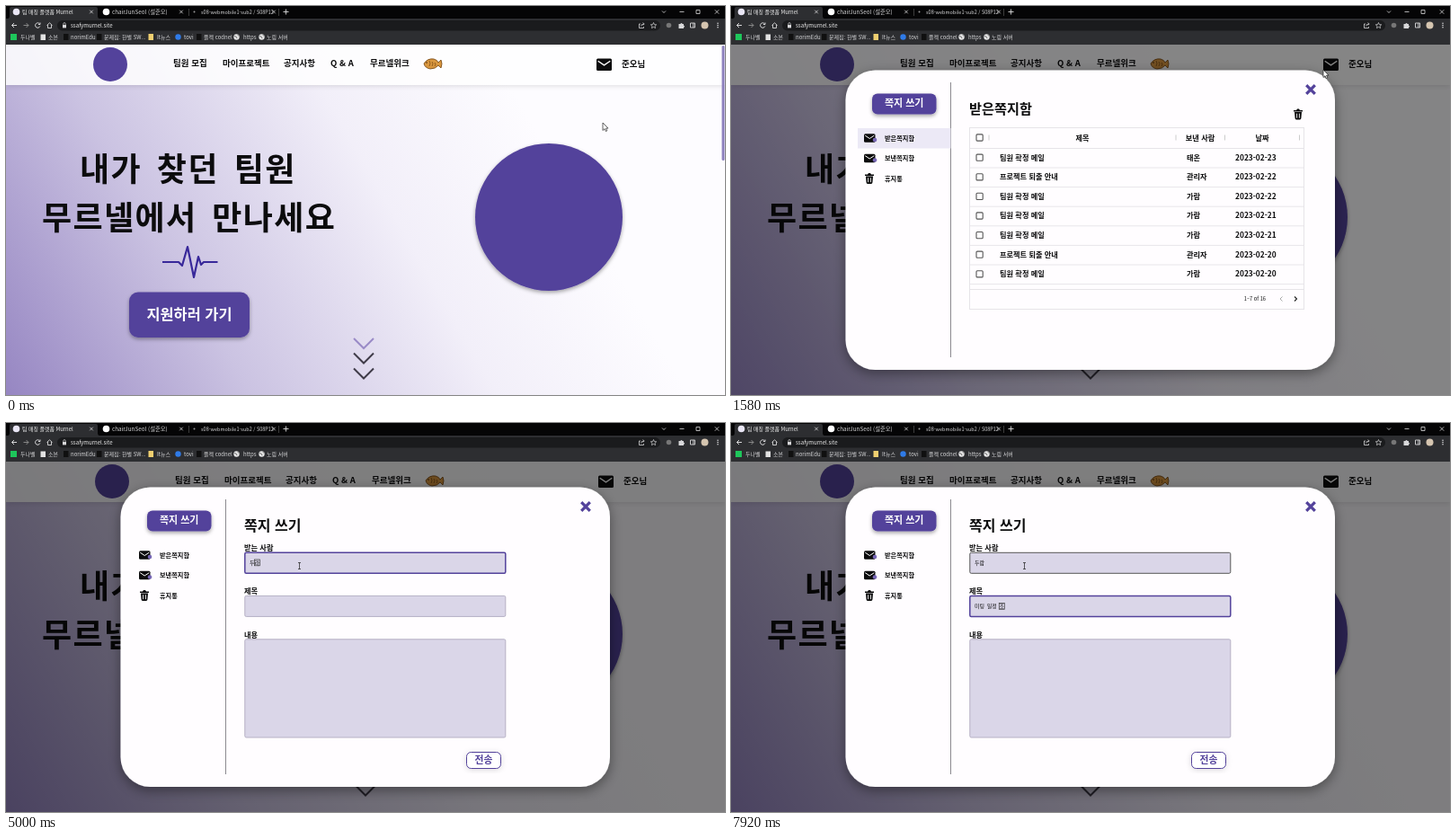
An HTML page for the animation above (8000 ms loop, 800 px wide and 433 px high).

```html
<!DOCTYPE html>
<html lang="ko">
<head>
<meta charset="utf-8">
<title>팀 매칭 플랫폼</title>
<style>
  html, body { margin: 0; width: 100%; height: 100%; overflow: hidden; background: #fff; }
  svg { display: block; width: 100vw; height: 100vh; }
  text { font-family: "Noto Sans CJK KR", "Noto Sans CJK", "Noto Sans", sans-serif; white-space: pre; }
</style>
</head>
<body>
<svg id="stage" viewBox="0 0 800 433" xmlns="http://www.w3.org/2000/svg"></svg>
<script>
const PURPLE = '#53429b';
const INK = '#0c0c0d';
const LIGHT = '#d8d8da';

// Markup helpers
const text = (x, y, s, size, fill = INK, weight = 900, extra = '') =>
  `<text x="${x}" y="${y}" font-size="${size}" fill="${fill}" font-weight="${weight}" ${extra}>${s}</text>`;
const middle = 'text-anchor="middle"';
const rect = (x, y, w, h, fill, extra = '') =>
  `<rect x="${x}" y="${y}" width="${w}" height="${h}" fill="${fill}" ${extra}/>`;
const circle = (x, y, r, fill, extra = '') =>
  `<circle cx="${x}" cy="${y}" r="${r}" fill="${fill}" ${extra}/>`;
const line = (d, stroke, width = 1, extra = '') =>
  `<path d="${d}" fill="none" stroke="${stroke}" stroke-width="${width}" ${extra}/>`;
const shape = (d, fill, extra = '') => `<path d="${d}" fill="${fill}" ${extra}/>`;
const group = (id, body) => `<g id="${id}">${body}</g>`;
const cross = (x, y, r, stroke, width) =>
  line(`M${x - r} ${y - r}l${2 * r} ${2 * r}m0 ${-2 * r}l${-2 * r} ${2 * r}`, stroke, width);

const envelope = (x, y, w, h) =>
  rect(x, y, w, h, INK, 'rx="1.5"') +
  line(`M${x + w * .1} ${y + h * .2}L${x + w / 2} ${y + h * .55}L${x + w * .9} ${y + h * .2}`, '#fff', w * .08);
const trash = (x, y) =>
  shape(`M${x - 5} ${y - 4.5}h3l1 -1.5h2l1 1.5h3v1.5h-10z`, INK) +
  shape(`M${x - 4} ${y - 2.4}h8l-.6 7q-.1 1.4 -1.4 1.4h-4q-1.3 0 -1.4 -1.4z`, INK) +
  line(`M${x - 1.4} ${y - .8}v5m2.8 0v-5`, '#fff', .9);
const globe = (x, y) => circle(x, y, 3.2, '#e6e6e6') +
  line(`M${x - 2.4} ${y - 1}l2 .6l1 2m.4 -4l1.6 1.2`, '#555', .8);
const checkbox = (y) => rect(273, y - 3.6, 7.2, 7.2, 'none', 'rx="1" stroke="#555" stroke-width="1.1"');

function browserBar() {
  const tabClose = [95, 195, 298].map(x => cross(x, 6.5, 1.8, LIGHT, .8)).join('');
  const marks = [
    [16, '두나벨'], [47, '소븐'], [72, 'norimEdu'], [109, '문제집: 한벌 SW...'], [168, 'It뉴스'],
    [198, 'tovi'], [220, '플젝 codnel'], [264, 'https'], [290, '노림 서버']
  ].map(([x, s]) => text(x, 36.8, s, 6, LIGHT, 400)).join('');
  return rect(0, 0, 800, 43, '#2d2e31') + rect(0, 0, 800, 14, '#050506') +
    shape('M2 14Q4 14 4 11V3Q4 1 6 1H100Q102 1 102 3V11Q102 14 104 14z', '#2d2e31') +
    circle(11.5, 6.5, 3.8, '#e9e6f5') + text(18, 9, '팀 매칭 플랫폼 Murnel', 5.9, '#eee', 400) +
    circle(111.5, 6.5, 3.8, '#fff') + text(118, 9, 'chairJunSeol (설준오)', 6.3, LIGHT, 400) +
    circle(209.5, 6.5, 1, '#999') + text(217, 9, 's08-webmobile1-sub2 / S08P12', 5.5, LIGHT, 400) +
    tabClose + line('M203.5 3v8M303.5 3v8', '#555', .7) + line('M308.5 6.5h6m-3 -3v6', LIGHT, .9) +
    line('M730 5.5l2 2l2 -2M749.5 6.5h5M768 4.5h4v4h-4z', LIGHT, .8) + cross(791, 6.5, 2.2, LIGHT, .8) +
    line('M12 21.5H6.5m2.5 -2.5l-2.5 2.5l2.5 2.5', LIGHT) +
    line('M19.5 21.5h5.5m-2.5 -2.5l2.5 2.5l-2.5 2.5', '#888') +
    line('M37.5 20a2.7 2.7 0 1 0 .3 2.5M38 18.5v2h-2', LIGHT) +
    line('M45.5 21.5l3 -2.7l3 2.7M46.5 21v3.5h4V21', LIGHT, .9) +
    rect(57, 16, 671, 11.5, '#1a1b1d', 'rx="5.7"') +
    rect(63, 21, 4, 3.4, LIGHT) + line('M63.8 21v-1.2a1.2 1.2 0 0 1 2.4 0v1.2', LIGHT, .7) +
    text(72, 24, 'ssafymurnel.site', 6.1, '#eee', 400) +
    line('M706 20h-1.5v4.5h5V23M706.5 22.5q0 -2.5 3.5 -2.5m-1.3 -1.5l1.5 1.5l-1.5 1.5', LIGHT, .8) +
    line('M720.5 18.5l.9 2.1l2.3 .2l-1.7 1.5l.5 2.3l-2 -1.2l-2 1.2l.5 -2.3l-1.7 -1.5l2.3 -.2z', LIGHT, .7) +
    circle(737.5, 21.5, 2.8, '#777') +
    shape('M748.5 20h2a1 1 0 0 1 2 0h1.5v1.7a1 1 0 0 1 0 2v1.3h-5.5z', LIGHT) +
    line('M761.5 19h5v5h-5zM764.8 19v5', LIGHT, .9) +
    circle(777.5, 21.5, 4, '#d5c5b0') + [-2.3, 0, 2.3].map(d => circle(792, 21.5 + d, .8, LIGHT)).join('') +
    rect(5, 31, 7, 7, '#1ec65b') + rect(38.5, 31.5, 5.5, 6.5, '#e2e2e2') +
    [64, 101, 212].map(x => rect(x, 31, 5.5, 7, '#101010')).join('') +
    rect(158.5, 31, 5.5, 7, '#f0cf70') + circle(191.5, 34.5, 3.2, '#2f7be8') +
    globe(256.5, 34.5) + globe(284.5, 34.5) + marks;
}

function page() {
  const nav = [[186, '팀원 모집'], [241, '마이프로젝트'], [309, '공지사항'], [361, 'Q &amp; A'], [405, '무르넬위크']]
    .map(([x, s]) => text(x, 67.3, s, 9.5)).join('');
  const fish = shape('M465 64q4 -6 11 -5q4 1 5 4l3 -3q2 4 0 9l-3 -3q-3 4 -9 4q-6 -1 -7 -6z', '#d9973f', 'stroke="#70420f" stroke-width=".8"') +
    line('M471 61q2 3 0 6m3 -5q2 2 0 5m3 -4q2 2 0 4', '#70420f', .7) + circle(468, 63, .8, '#40240a');
  const chevrons = [['#9a8bc7', 370], ['#3f3b48', 386.5], ['#3f3b48', 403.5]]
    .map(([c, y]) => line(`M387 ${y}l11 11l11 -11`, c, 2)).join('');
  const hero = (x, y, s) => text(x, y, s, 36, INK, 700, 'letter-spacing="1.35" word-spacing="5.5"');
  return rect(0, 42, 800, 391, 'url(#sky)') +
    hero(82, 195, '내가 찾던 팀원') + hero(40, 249, '무르넬에서 만나세요') +
    line('M174 285H192L196 289L202 268L209 302L214 279L217 288L220 285H235.5', '#38289a', 2.2, 'stroke-linejoin="round"') +
    rect(137, 318.5, 134, 50.5, PURPLE, 'rx="10" filter="url(#soft)"') +
    text(204, 348.5, '지원하러 가기', 16.4, '#fff', 700, middle) +
    circle(604, 235, 82, PURPLE, 'filter="url(#soft)"') +
    group('chevrons', chevrons) +
    rect(0, 42, 800, 46, '#fff', 'opacity=".86" filter="url(#faint)"') +
    group('header', circle(116, 65, 19, PURPLE) + nav + fish + envelope(657, 58.5, 17, 13.5) + text(685, 68.3, '준오님', 9.5)) +
    rect(796.5, 44, 3, 128, '#8d80bd', 'rx="1.5" id="scrollbar"') +
    rect(0, 42, 800, 391, '#000', 'id="shade" opacity="0"');
}

function inbox() {
  const confirm = '팀원 확정 메일', leave = '프로젝트 퇴출 안내';
  const mails = [
    [confirm, '태온', 23], [leave, '관리자', 22], [confirm, '가람', 22], [confirm, '가람', 21],
    [confirm, '가람', 21], [leave, '관리자', 20], [confirm, '가람', 20]
  ];
  const rows = mails.map(([title, sender, day], i) => {
    const y = 168.7 + i * 21.6;
    const cell = (x, s, size) => text(x, y + 2.9, s, size, INK, 700);
    return checkbox(y) + cell(299, title, 8.2) + cell(507, sender, 8.2) + cell(561, `2023-02-${day}`, 8.4) +
      line(`M266 ${y + 11.3}H637`, '#e8e6ea');
  }).join('');
  const pager = (label, next) => text(595, 327.8, label, 5.7, INK, 500, 'text-anchor="end"') +
    line('M613.5 323.5l-2.5 2.5l2.5 2.5', '#aaa') + line('M627 323.5l2.5 2.5l-2.5 2.5', next, 1.1);
  return rect(141, 136, 103.5, 22.5, '#ece9f6') +
    text(265, 119.5, '받은쪽지함', 15.2) + trash(631, 120.5) +
    rect(265.5, 135.5, 372, 202, 'none', 'stroke="#e6e4e8"') +
    line('M266 158.5H637M266 315.5H637', '#e6e4e8') +
    line('M287 143.5v6M495 143.5v6M549.5 143.5v6M632.5 143.5v6', '#ccc') +
    checkbox(146.5) + text(391, 149.5, '제목', 8.2, INK, 900, middle) +
    text(522, 149.5, '보낸 사람', 8.2, INK, 900, middle) + text(591, 149.5, '날짜', 8.2, INK, 900, middle) +
    group('empty', text(451.5, 238.5, 'No rows', 5.8, INK, 500, middle) + pager('0–0 of 0', '#aaa')) +
    group('rows', rows + pager('1–7 of 16', '#222'));
}

function compose() {
  const field = (id, y, h) => rect(265.8, y, 290, h, '#dad6e8', `id="${id}" rx="1.5" stroke="#b5b0c4"`);
  const typed = (id, y) => text(271, y, '', 6, INK, 500, `id="${id}" word-spacing="1"`) +
    rect(0, y - 5.5, 6, 6.8, 'none', `id="${id}Box" stroke="#333" stroke-width=".7"`);
  return text(265, 120, '쪽지 쓰기', 16) + text(265, 142, '받는 사람', 8.2) + text(265, 190.2, '제목', 8.2) +
    text(265, 239, '내용', 8.2) + field('toField', 144.3, 23) + field('titleField', 192.4, 23) + field('bodyField', 240.8, 109.2) +
    typed('to', 157.5) + typed('title', 206) +
    rect(512.5, 366.5, 38, 18, '#fff', `rx="5" stroke="${PURPLE}" filter="url(#faint)"`) +
    text(531.5, 378.8, '전송', 10.8, PURPLE, 700, middle);
}

function modal() {
  const folders = [[147, '받은쪽지함'], [169.5, '보낸쪽지함']].map(([y, s]) =>
    envelope(148, y - 4.7, 12.5, 9.5) + circle(160, y + 2, 2.3, '#7767b5') + text(171, y + 2.8, s, 7.2)).join('');
  return rect(127.5, 71.5, 544.5, 333.5, '#fffdff', 'rx="33" filter="url(#deep)"') +
    line('M244.5 85V391', '#8c8a90') + cross(645, 93, 4.8, PURPLE, 3.2) +
    rect(157, 97.5, 71.5, 23, PURPLE, 'id="writeButton" rx="6" filter="url(#soft)"') +
    text(192.7, 112, '쪽지 쓰기', 11, '#fff', 700, `id="writeLabel" ${middle}`) +
    group('inbox', inbox()) + group('compose', compose()) +
    folders + trash(154, 192) + text(171, 194.5, '휴지통', 7.2);
}

const pointers =
  group('arrow', shape('M0 0V8.5L2 6.7L3.4 9.5L4.8 8.9L3.5 6.1H6z', '#fff', 'stroke="#222" stroke-width=".7"')) +
  group('hand', shape('M-1 0q1 -1.2 2 0v3.5l3.5 1q1 .4 .8 1.8l-.8 3.2h-4.5l-3 -4q0 -1 1 -.8l1 .8z', '#fff', 'stroke="#222" stroke-width=".8"')) +
  group('beam', line('M-1.5 -3.5h3M0 -3.5v7M-1.5 3.5h3', '#333', .8));

const shadow = (id, dy, blur, alpha) =>
  `<filter id="${id}" x="-20%" y="-30%" width="140%" height="160%"><feDropShadow dx="0" dy="${dy}" stdDeviation="${blur}" flood-opacity="${alpha}"/></filter>`;

document.getElementById('stage').innerHTML =
  `<defs><linearGradient id="sky" gradientUnits="userSpaceOnUse" x1="0" y1="433" x2="570" y2="104">
    <stop offset="0" stop-color="#9686c2"/><stop offset=".36" stop-color="#cbc3e2"/>
    <stop offset=".72" stop-color="#f2eff9"/><stop offset="1" stop-color="#fdfcff"/>
  </linearGradient>${shadow('soft', 2, 2, .35)}${shadow('faint', 1, 3, .15)}${shadow('deep', 4, 7, .4)}</defs>` +
  page() + group('modal', modal()) + browserBar() + group('pointer', pointers);

const $ = id => document.getElementById(id);
const show = (id, on) => $(id).setAttribute('display', on ? 'inline' : 'none');
const set = (id, attrs) => Object.entries(attrs).forEach(([k, v]) => $(id).setAttribute(k, v));
const clamp = (v, lo, hi) => Math.max(lo, Math.min(hi, v));

// Timeline in ticks, 12 per second
const LOOP = 8000, OPEN = 17, LOADED = 19, HOVER = 30, COMPOSE = 38, LEAVE = 41, BEAM = 44, TO_FOCUS = 48, TITLE_FOCUS = 66;
const path = [[0, 664, 130], [3, 664, 130], [11, 662, 72], [17, 660, 68], [19, 659, 71], [22, 659, 71],
  [31, 208, 115], [40, 208, 115], [45, 326.5, 159]];
const toKeys = ['ㄷ', '두', '둘', '두라', '두람'];
const titleKeys = ['ㅁ', '미', '밑', '미티', '미팅', '미팅 ', '미팅 ㅇ', '미팅 이', '미팅 일', '미팅 일ㅈ',
  '미팅 일저', '미팅 일정', '미팅 일정 ', '미팅 일정 ㅈ', '미팅 일정 조'];

function pointerAt(tick) {
  const i = path.findIndex(p => p[0] > tick);
  if (i < 0) return path[path.length - 1].slice(1);
  const [t0, x0, y0] = path[i - 1], [t1, x1, y1] = path[i];
  const k = (tick - t0) / (t1 - t0), e = k * k * (3 - 2 * k);
  return [x0 + (x1 - x0) * e, y0 + (y1 - y0) * e];
}

function type(id, keys, index, focused) {
  const value = keys[Math.min(index, keys.length - 1)] || '';
  const composing = focused && value !== '' && !value.endsWith(' ');
  $(id).textContent = value;
  show(id + 'Box', composing);
  if (composing) set(id + 'Box', { x: 271 + $(id).getComputedTextLength() - 5.7 });
}

function render(tick) {
  const open = tick >= OPEN, writing = tick >= COMPOSE, loaded = tick >= LOADED;
  const hover = tick >= HOVER && tick < LEAVE, beam = tick >= BEAM;
  const toFocus = tick >= TO_FOCUS && tick < TITLE_FOCUS, titleFocus = tick >= TITLE_FOCUS;

  show('modal', open);
  show('scrollbar', !open);
  ['header', 'chevrons'].forEach(id => set(id, { transform: `translate(${open ? 2 : 0} 0)` }));
  set('shade', { opacity: clamp((tick - OPEN) * .24, 0, .5) });
  show('inbox', !writing);
  show('compose', writing);
  show('empty', !loaded);
  show('rows', loaded);
  set('writeButton', { fill: hover ? '#bab0dc' : PURPLE, stroke: hover ? PURPLE : 'none' });
  set('writeLabel', { fill: hover ? '#75679f' : '#fff' });

  set('toField', { stroke: toFocus ? PURPLE : beam ? '#555' : '#b5b0c4', 'stroke-width': toFocus ? 1.5 : 1 });
  set('titleField', { stroke: titleFocus ? PURPLE : '#b5b0c4', 'stroke-width': titleFocus ? 1.5 : 1 });
  type('to', toKeys, Math.floor((tick - 52) / 2.5), toFocus);
  type('title', titleKeys, Math.floor((tick - 69.4) / 1.8), titleFocus);

  const [x, y] = pointerAt(tick);
  set('pointer', { transform: `translate(${x} ${y})` });
  show('hand', hover);
  show('beam', beam);
  show('arrow', !hover && !beam);
}

const start = performance.now();
function frame() {
  const t = (performance.now() - start) % LOOP;
  render(clamp(Math.floor((t + 4) * 12 / 1000), 0, 95));
  requestAnimationFrame(frame);
}
frame();
</script>
</body>
</html>
```
